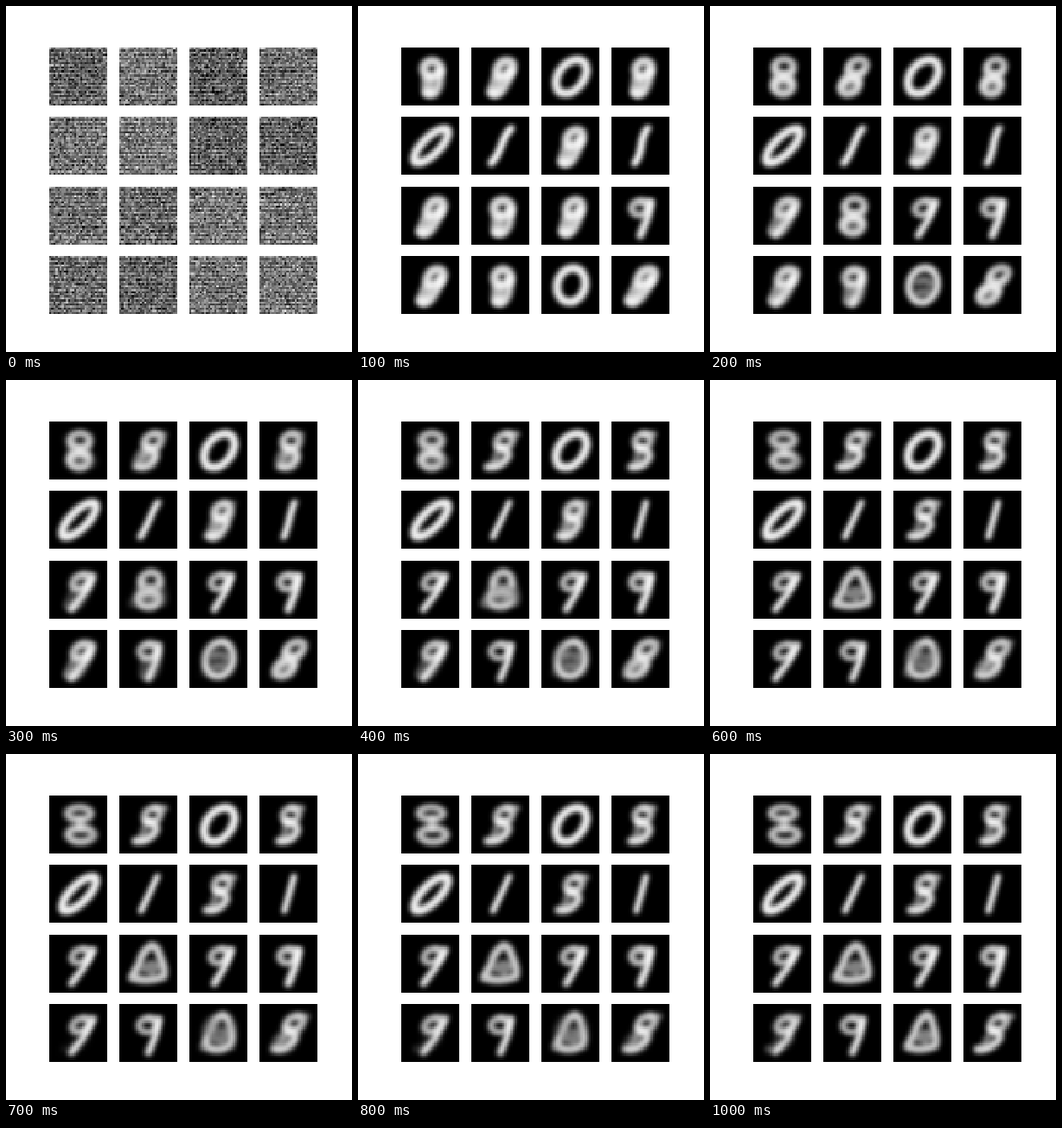
An HTML page with a canvas for the animation above (1.1 s loop, 400 by 400 pixels).

```html
<!DOCTYPE html>
<html lang="en">
<head>
<meta charset="utf-8">
<title>Digits emerging from noise</title>
<style>
html, body { margin: 0; width: 100%; height: 100%; overflow: hidden; background: #fff; }
canvas { display: block; }
</style>
</head>
<body>
<canvas id="stage" width="400" height="400"></canvas>
<script>
const SIZE = 67, CELLS = 28, STEP = 100, STEPS = 11;
const ctx = document.getElementById('stage').getContext('2d');
ctx.imageSmoothingEnabled = false;

// Strokes are upright and centred on 0,0: line is a path, ring an ellipse.
const line = (d, width, alpha) => ({ path: new Path2D(d), width, alpha });
function ring(x, y, rx, ry, width, alpha) {
  const path = new Path2D();
  path.ellipse(x, y, rx, ry, 0, 0, 2 * Math.PI);
  return { path, width, alpha };
}

const zero = ring(0, 0, 16.5, 20, 8, .95);
const glyphs = {
  zero: [zero],
  theta: [{ ...zero, alpha: .85 }, line('M-6 -4Q2 -8 8 -2M-5 9L6 8', 9, .45)],
  one: [line('M0 -20V20', 6.5, 1)],
  bent: [line('M2 -20Q-2 -14 0 0Q2 14 -2 20', 7, 1)],
  blob: [ring(1, -9, 9, 9, 9, .85), line('M9 -6Q10 12 4 19Q0 21 -4 19', 9, .8), line('M-3 4V17', 13, .72)],
  eight: [ring(1, -11, 10, 9, 8, .75), ring(0, 11, 10, 9, 9, .8),
    line('M-9 -12V12M9 -8V8', 7, .4), line('M0 -2V8', 14, .35)],
  hourglass: [ring(0, -13, 13, 7, 8, .75), ring(2, 12, 14, 8, 9, .75), line('M1 -6V4', 10, .5)],
  ess: [ring(0, -11, 9, 8, 8, .75), line('M0 -19H12', 7, .6),
    line('M-4 -3Q12 -1 10 9Q5 21 -9 19', 9, .85), line('M-3 5V14', 10, .45)],
  nine: [ring(-2, -9, 10, 8, 7, .75), line('M-2 -17H11', 6, .45), line('M10 -15Q9 4 0 23', 7.5, .92)],
  bell: [line('M1 -21Q-8 -14 -10 0L-17 16Q0 22 15 15Q18 8 10 -10Q7 -22 1 -21Z', 9, .8),
    line('M-4 6Q2 -4 8 3L3 10', 10, .5)]
};

// Each tile leans by its slant and blends between the glyphs of its key steps.
const tile = (slant, width, keys) => ({ slant, width, keys });
const tiles = [
  tile(0, 1.1, { 1: 'blob', 2: 'eight', 8: 'hourglass' }),
  tile(.35, 1, { 1: 'blob', 2: 'eight', 4: 'ess' }),
  tile(.35, 1, { 1: 'zero' }),
  tile(.15, 1, { 1: 'blob', 2: 'eight', 4: 'ess' }),
  tile(.75, .8, { 1: 'zero' }),
  tile(.48, 1, { 1: 'bent', 4: 'one' }),
  tile(.3, 1, { 1: 'blob', 6: 'ess' }),
  tile(.28, 1, { 1: 'bent', 4: 'one' }),
  tile(.4, 1, { 1: 'blob', 4: 'nine' }),
  tile(.05, 1.15, { 1: 'blob', 2: 'eight', 6: 'bell' }),
  tile(.25, 1, { 1: 'blob', 2: 'nine' }),
  tile(.05, 1, { 1: 'nine' }),
  tile(.4, 1, { 1: 'blob', 6: 'nine', 16: 'ess' }),
  tile(.05, 1.05, { 1: 'blob', 4: 'nine' }),
  tile(.1, 1, { 1: 'zero', 2: 'theta', 10: 'bell' }),
  tile(.5, 1, { 1: 'blob', 2: 'eight', 10: 'ess' })
];

function grid(draw) {
  const canvas = document.createElement('canvas');
  canvas.width = canvas.height = CELLS;
  const g = canvas.getContext('2d');
  g.fillRect(0, 0, CELLS, CELLS);
  draw(g);
  return canvas;
}

// Earlier steps have thicker strokes.
const drawGlyph = (name, { slant, width }, step) => grid(g => {
  const lean = new DOMMatrix([width, 0, -slant, 1, SIZE / 2 + 1, SIZE / 2]);
  g.scale(CELLS / SIZE, CELLS / SIZE);
  g.filter = 'blur(0.85px)';
  g.strokeStyle = '#fff';
  g.lineCap = g.lineJoin = 'round';
  for (const stroke of glyphs[name]) {
    const path = new Path2D();
    path.addPath(stroke.path, lean);
    g.lineWidth = stroke.width * (1 + .2 / step);
    g.globalAlpha = stroke.alpha;
    g.stroke(path);
  }
});

let seed = 7;
function random() {
  seed = (seed * 1664525 + 1013904223) % 4294967296;
  return seed / 4294967296;
}

// Soft grain with darker dashes on every other row.
const drawNoise = () => grid(g => {
  const mean = 92 + random() * 28;
  for (let y = 0; y < CELLS; y++) {
    for (let x = 0; x < CELLS; x++) {
      const grain = (random() + random() + random() - 1.5) * 66;
      const dash = y % 2 ? -random() * 40 : 20;
      const v = Math.max(0, Math.round(mean + grain + dash));
      g.fillStyle = `rgb(${v},${v},${v})`;
      g.fillRect(x, y, 1, 1);
    }
  }
});

for (const t of tiles) {
  t.noise = drawNoise();
  t.poses = Object.entries(t.keys).map(([step, name]) =>
    ({ step: +step, image: drawGlyph(name, t, step) }));
}

function drawTile({ noise, poses }, i, step) {
  const x = Math.round(50 + i % 4 * 81);
  const y = Math.round(48 + (i >> 2) * 80.4);
  const put = (image, alpha) => {
    ctx.globalAlpha = alpha;
    ctx.drawImage(image, x, y, SIZE, SIZE);
  };
  ctx.globalCompositeOperation = 'source-over';
  if (step === 0) return put(noise, 1);

  const last = poses[poses.length - 1];
  const b = poses.find(p => p.step >= step) || last;
  const a = poses.findLast(p => p.step <= step);
  const mix = a === b ? 1 : (step - a.step) / (b.step - a.step);
  ctx.globalAlpha = 1;
  ctx.fillStyle = '#000';
  ctx.fillRect(x, y, SIZE, SIZE);
  ctx.globalCompositeOperation = 'lighter';
  put(a.image, 1 - mix);
  put(b.image, mix);
}

let shown = -1;
function frame() {
  const step = Math.floor(performance.now() / STEP) % STEPS;
  if (step !== shown) {
    shown = step;
    tiles.forEach((t, i) => drawTile(t, i, step));
  }
  requestAnimationFrame(frame);
}
frame();
</script>
</body>
</html>
```
